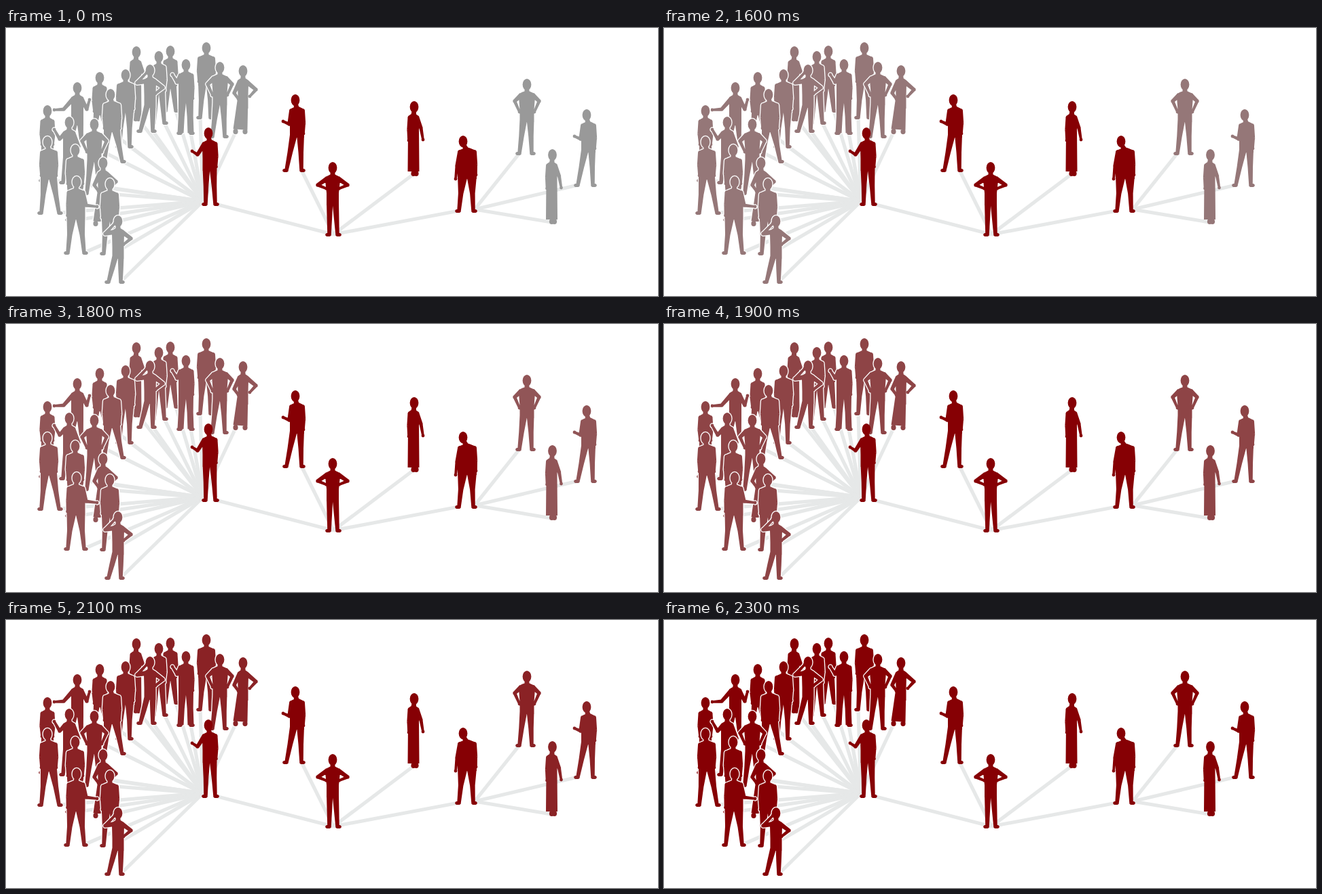
Write an HTML page that moves like this. It is 960x396 px and loops after 5.3 s.

```html
<!DOCTYPE html>
<html lang="en">
<head>
<meta charset="utf-8">
<title>Network of people</title>
<style>
  html, body { margin: 0; width: 100%; height: 100%; overflow: hidden; background: #fff; }
  svg { display: block; width: 100%; height: 100%; }
  #links { stroke: #e6e8e8; stroke-width: 5.2; }
  #crowd { stroke: #fff; stroke-width: 2.6; stroke-linejoin: round; paint-order: stroke; }
</style>
</head>
<body>
<svg viewBox="0 0 960 396" xmlns="http://www.w3.org/2000/svg">
  <g id="links"></g>
  <g id="crowd"></g>
  <g id="outer"></g>
  <g id="reached"></g>
</svg>
<script>
// A pose is a few key points measured from the top of the head.
// Arms are elbow and hand; an arm that is not given hangs at the side.
const basePose = { height: 114, lean: 0, shoulder: 12.5, waist: 12, feet: [-9, 6], ankle: 5.5 };
const poses = {
  upright: {},
  narrow: { shoulder: 10, waist: 9, feet: [-7, 8] },
  striding: { height: 116, lean: 2, feet: [-9, 17] },
  stout: { lean: 6, shoulder: 13.5, waist: 14, feet: [-6, 15], left: [[-9, 45], [-11, 64]] },
  pointing: { height: 115, lean: 2.5, shoulder: 11, waist: 10.5, feet: [-13, 9], left: [[-9, 44], [-18, 40]] },
  offering: { height: 116, lean: -1, shoulder: 13, waist: 13.5, feet: [-13, 11], right: [[14, 43], [30, 45]] },
  mug: { height: 116, lean: 2, shoulder: 11, waist: 10.5, feet: [-4, 10], left: [[-16, 40], [-24, 35]] },
  flared: { height: 112, shoulder: 11, waist: 11, feet: [-8, 7], ankle: 9, left: [[-13, 34], [-20, 23]] },
  akimbo: { height: 110, shoulder: 11, waist: 9, feet: [-5, 7], left: [[-22, 34], [-10, 39]], right: [[22, 34], [10, 39]] },
  capped: { height: 113, shoulder: 12, waist: 10.5, feet: [-11, 7], left: [[-18, 33], [-11, 49]], right: [[18, 33], [11, 49]] },
  salute: { height: 101, shoulder: 9, waist: 8.5, feet: [-14, 4], left: [[-19, 27], [-5, 12]], right: [[19, 34], [8, 43]] },
  reaching: { height: 90, shoulder: 9, waist: 9, left: [[-20, 40], [-34, 41]], right: [[14, 40], [18, 26]] },
  shrugging: { height: 100, shoulder: 9, waist: 9, left: [[-14, 33], [-22, 19]], right: [[14, 44], [5, 52]] },
  gown: { height: 111, lean: -1, shoulder: 8, waist: 8, feet: [-1, 3], right: [[10, 40], [13, 57]], hem: [-1, 17] },
  longdress: { height: 102, shoulder: 8, waist: 7.5, feet: [-11, 3], left: [[-13, 41], [-7, 50]], right: [[19, 36], [10, 46]], hem: [-4, 21] }
};

// Pose, head position and, where it differs, height; back to front.
const groups = {
  crowd: [
    ["gown", 192, 27], ["narrow", 242, 26, 99], ["upright", 295, 21], ["narrow", 225, 34, 109],
    ["narrow", 138, 65, 85], ["reaching", 105, 80], ["narrow", 61, 114], ["upright", 176, 61, 117],
    ["salute", 212, 54], ["flared", 265, 46], ["capped", 315, 50], ["longdress", 349, 55],
    ["shrugging", 93, 131], ["striding", 154, 90, 110], ["capped", 130, 134], ["striding", 61, 160],
    ["upright", 102, 172], ["longdress", 143, 191], ["upright", 153, 222], ["offering", 104, 219],
    ["salute", 165, 277]
  ],
  outer: [["capped", 767, 75], ["pointing", 855, 120], ["gown", 804.5, 179]],
  reached: [["mug", 298, 147], ["pointing", 426, 98], ["akimbo", 481, 198], ["gown", 601, 108], ["stout", 673, 159]]
};

// Every part runs counterclockwise, so overlapping parts fill as one silhouette.
function limb([x1, y1], [x2, y2], w1, w2) {
  const length = Math.hypot(x2 - x1, y2 - y1);
  const nx = (y1 - y2) / length / 2, ny = (x2 - x1) / length / 2;
  return `M${x1 + nx * w1},${y1 + ny * w1}L${x2 + nx * w2},${y2 + ny * w2}`
    + `L${x2 - nx * w2},${y2 - ny * w2}L${x1 - nx * w1},${y1 - ny * w1}Z`;
}

const oval = ([x, y], rx, ry = rx) =>
  `M${x - rx},${y}a${rx},${ry} 0 1 0 ${2 * rx},0a${rx},${ry} 0 1 0 ${-2 * rx},0Z`;

function torso({ lean, shoulder, waist }) {
  const at = (dx, y) => `${lean + dx},${y}`;
  return `M${at(0, 17)}C${at(-shoulder / 2, 20)} ${at(-shoulder, 20)} ${at(-shoulder, 27)}`
    + `L${at(-waist, 46)}L${at(-waist, 64)}L${at(waist, 64)}L${at(waist, 46)}`
    + `L${at(shoulder, 27)}C${at(shoulder, 20)} ${at(shoulder / 2, 20)} ${at(0, 17)}Z`;
}

function arm({ lean, shoulder, waist }, side, bend) {
  const joint = [lean + side * (shoulder - 3), 24.5];
  const [elbow, hand] = bend || [[lean + side * (shoulder - 1), 43], [lean + side * (waist - 1), 58]];
  return oval(joint, 3.5) + limb(joint, elbow, 7, 5.4) + oval(elbow, 2.7)
    + limb(elbow, hand, 5, 3.6) + oval(hand, 2.4);
}

function leg({ lean, waist, height, ankle }, side, footX) {
  const hip = [lean + side * waist * 0.48, 60];
  const foot = [footX, height - 3];
  const knee = [hip[0] + (footX - hip[0]) * 0.5, (hip[1] + foot[1]) / 2];
  const calf = Math.max(ankle, 7.5);
  return limb(hip, knee, waist * 1.04, calf) + oval(knee, calf / 2)
    + limb(knee, foot, calf, ankle) + oval([footX + side * 1.5, height - 2.6], 4.3, 2.6);
}

function silhouette(pose) {
  const { lean, waist, height, feet, hem } = pose;
  const skirt = hem ? limb([lean, 46], [hem[0], height - 7], waist * 2, hem[1]) : "";
  const legs = leg(pose, -1, feet[0]) + leg(pose, 1, feet[1]);
  const shoes = feet.map(x => oval([x, height - 4], 3.6, 4)).join("");
  return oval([0, 8.6], 6.4, 8.6) + limb([0, 12], [lean, 23], 6, 8) + torso(pose)
    + arm(pose, -1, pose.left) + arm(pose, 1, pose.right) + (hem ? skirt + shoes : legs);
}

const $ = id => document.getElementById(id);

function add(parent, tag, attributes) {
  const node = document.createElementNS("http://www.w3.org/2000/svg", tag);
  for (const name in attributes) node.setAttribute(name, attributes[name]);
  parent.append(node);
}

const poseOf = ([name, , , height]) => ({ ...basePose, ...poses[name], ...(height && { height }) });

// A link ends at whichever foot is closer to its hub.
function link([x1, y1], person) {
  const { feet, height } = poseOf(person);
  const [, x, y] = person;
  const [x2] = feet.map(foot => x + foot).sort((a, b) => Math.abs(a - x1) - Math.abs(b - x1));
  add($("links"), "line", { x1, y1, x2, y2: y + height - 3 });
}

const [mug, pointing, , gown, stout] = groups.reached;
groups.crowd.forEach(person => link([290, 256], person));
[mug, pointing, gown, stout].forEach(person => link([482, 305], person));
groups.outer.forEach(person => link([690, 268], person));

for (const id in groups)
  for (const person of groups[id])
    add($(id), "path", { d: silhouette(poseOf(person)), transform: `translate(${person[1]} ${person[2]})` });

// Grey holds, turns red in equal hard steps, then holds again.
const duration = 5300, fadeStart = 1500, stepTime = 100, steps = 9;
const grey = [153, 153, 153], red = [134, 0, 4];
const shade = k => `rgb(${grey.map((c, i) => Math.round(c + (red[i] - c) * k))})`;
const frames = Array.from({ length: steps + 1 }, (_, i) => ({
  offset: i && (fadeStart + (i - 1) * stepTime) / duration,
  fill: shade(i / steps),
  easing: "step-end"
}));
frames.push({ offset: 1, fill: shade(1) });

$("reached").style.fill = shade(1);
for (const id of ["crowd", "outer"])
  $(id).animate(frames, { duration, iterations: Infinity }).startTime = 0;
</script>
</body>
</html>
```
